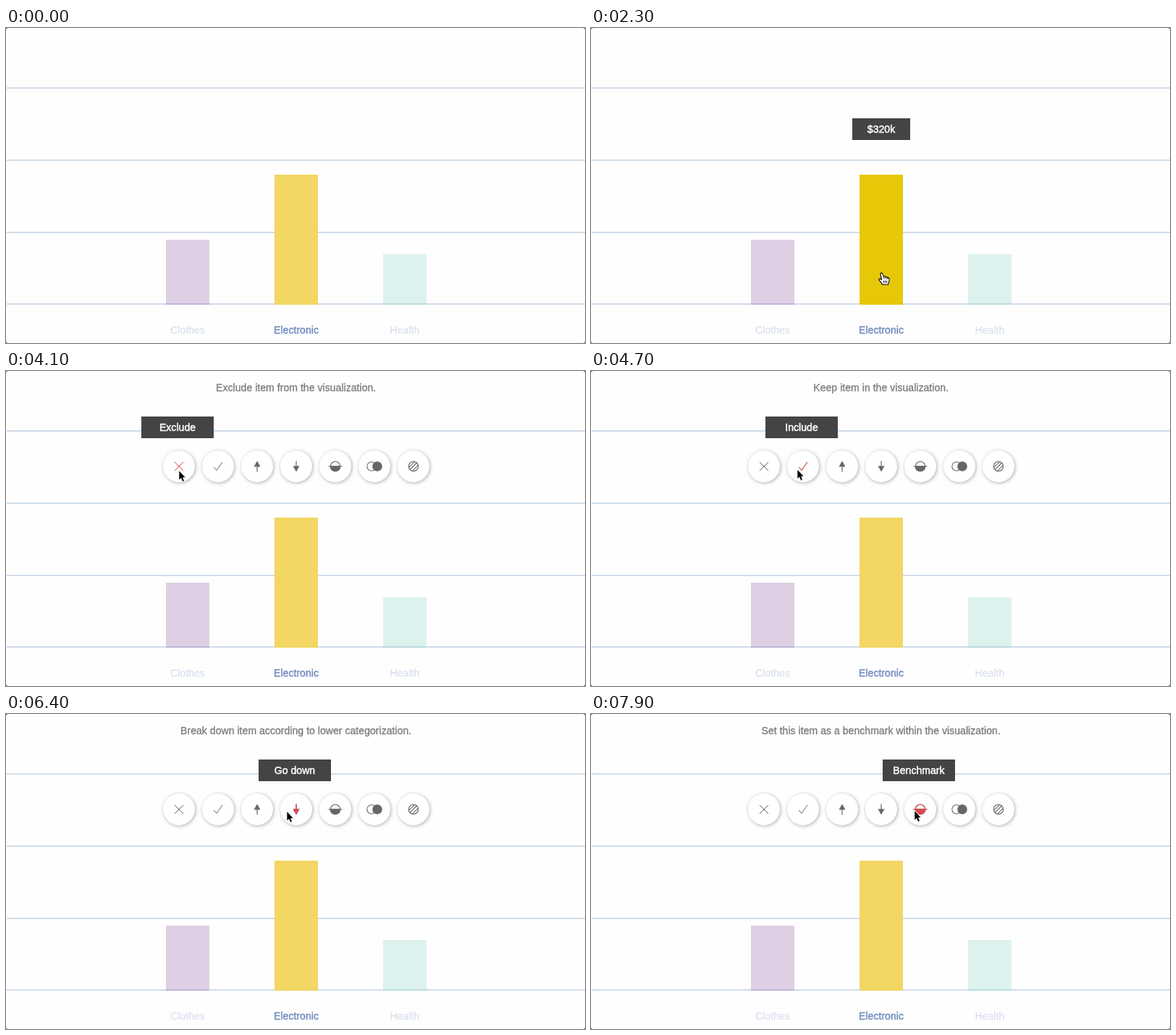
An HTML page that plays this animation: 800x436 px, repeating every 8000 ms.

```html
<!DOCTYPE html>
<html lang="en">
<head>
<meta charset="utf-8">
<title>Bar chart menu</title>
<style>
html, body { margin: 0; width: 100%; height: 100%; overflow: hidden; background: #777; }
svg { display: block; width: 800px; height: 436px; }
text { font: 14px "Liberation Sans", Arial, sans-serif; letter-spacing: .05px; text-anchor: middle; stroke-width: .35px; }
.grid { stroke: #d0dcea; stroke-width: 2; }
.dim { fill: #d6deec; stroke: #d6deec; stroke-width: .15px; }
.name { fill: #6b87bb; stroke: #6b87bb; }
.tip { fill: #fff; stroke: #fff; stroke-width: .5px; }
.note { fill: #7c7c7c; stroke: #7c7c7c; }
.box { fill: #444; }
.disc { fill: #fff; filter: drop-shadow(1px 1px 2.5px rgba(0, 0, 0, .32)); }
.icon { color: #666; }
.hot .icon { color: #dc4650; }

.bar, .menu, .cursor, .arrow, .hand, .hot, .value { animation: 8s linear infinite both; }
.bar { animation-name: shade; }
.menu { animation-name: menu; }
.cursor { animation-name: move; }
.arrow { animation-name: arrow; animation-timing-function: step-end; }
.hand { animation-name: hand; animation-timing-function: step-end; }
.value { animation-name: value; }
.exclude { animation-name: exclude; }
.include { animation-name: include; }
.up { animation-name: up; }
.down { animation-name: down; }
.bench { animation-name: bench; }

@keyframes shade {
  0%, 11.9% { fill: #f3d663; }
  13.6%, 43.7% { fill: #e7c809; }
  45.6%, 100% { fill: #f3d663; }
}
@keyframes menu { 0%, 31.2% { opacity: 0; } 33.6%, 100% { opacity: 1; } }
@keyframes arrow { 0% { opacity: 1; } 11.9% { opacity: 0; } 34.6% { opacity: 1; } }
@keyframes hand { 0% { opacity: 0; } 11.9% { opacity: 1; } 34.6% { opacity: 0; } }
@keyframes value { 0%, 12.2% { opacity: 0; } 13.8%, 30.6% { opacity: 1; } 31.8%, 100% { opacity: 0; } }
@keyframes exclude { 0%, 43.7% { opacity: 0; } 45%, 54.4% { opacity: 1; } 55.2%, 100% { opacity: 0; } }
@keyframes include { 0%, 55.3% { opacity: 0; } 56.2%, 66.3% { opacity: 1; } 67.1%, 100% { opacity: 0; } }
@keyframes up { 0%, 67.2% { opacity: 0; } 68.2%, 78.1% { opacity: 1; } 78.9%, 100% { opacity: 0; } }
@keyframes down { 0%, 79% { opacity: 0; } 79.8%, 88.2% { opacity: 1; } 89%, 100% { opacity: 0; } }
@keyframes bench { 0%, 89% { opacity: 0; } 89.9%, 100% { opacity: 1; } }

@keyframes move {
  0%, 7.4% { transform: translate(424px, 444px); }
  8.75% { transform: translate(421px, 428px); }
  11.25% { transform: translate(413px, 392px); }
  12.5% { transform: translate(409px, 376px); }
  15% { transform: translate(406px, 356px); }
  18.75% { transform: translate(404px, 342px); }
  21.25%, 31.25% { transform: translate(403px, 339px); }
  32.5% { transform: translate(396px, 325px); }
  35% { transform: translate(365px, 250px); }
  37.5% { transform: translate(340px, 198px); }
  40% { transform: translate(312px, 176px); }
  42.5% { transform: translate(272px, 154px); }
  45% { transform: translate(248px, 143px); }
  51.25%, 52.5% { transform: translate(239px, 138px); }
  55% { transform: translate(266px, 138px); }
  57.5% { transform: translate(283px, 137px); }
  60%, 64.4% { transform: translate(287px, 136px); }
  66.25% { transform: translate(312px, 136px); }
  67.5% { transform: translate(325px, 136px); }
  68.75% { transform: translate(328px, 136px); }
  74%, 76.9% { transform: translate(338px, 135px); }
  78.75% { transform: translate(372px, 135px); }
  80% { transform: translate(388px, 135px); }
  83.75% { transform: translate(396px, 135px); }
  86.25% { transform: translate(402px, 135px); }
  87.5% { transform: translate(412px, 135px); }
  88.75% { transform: translate(431px, 135px); }
  90.6% { transform: translate(442px, 134px); }
  96.25%, 100% { transform: translate(447px, 134px); }
}
</style>
</head>
<body>
<svg viewBox="0 0 800 436">
  <defs>
    <circle id="disc" r="22"/>
    <path id="i-cross" d="M-6-6 6 6M6-6-6 6" fill="none" stroke="currentColor"/>
    <path id="i-check" d="M-6 1-2 5.5 6-6" fill="none" stroke="currentColor"/>
    <path id="i-up" d="M0-7.5 4.5 .5H.6V7.5H-.6V.5H-4.5Z" fill="currentColor"/>
    <path id="i-down" d="M0 7.5 4.5-.5H.6V-7.5H-.6V-.5H-4.5Z" fill="currentColor"/>
    <g id="i-bench" stroke="currentColor" stroke-width="1.1">
      <circle r="6.7" fill="none"/>
      <path d="M-6.7 0A6.7 6.7 0 0 0 6.7 0Z" fill="currentColor"/>
      <path d="M-9.5 0H9.5"/>
    </g>
    <g id="i-merge" stroke="currentColor" stroke-width="1.1">
      <circle cx="-4" r="6.2" fill="none"/>
      <circle cx="4" r="6.2" fill="currentColor"/>
    </g>
    <g id="i-hatch" stroke="currentColor" stroke-width="1.1" fill="none">
      <circle r="6.7"/>
      <path d="M-6.4 1.4 1.4-6.4M-5 4.6 4.6-5M-1.6 6.4 6.4-1.6"/>
    </g>
  </defs>

  <rect width="800" height="436" rx="3.5" fill="#fefefe"/>
  <path class="grid" d="M1 83H800M1 183H800M1 283H800M1 382H800"/>

  <rect x="221" y="293" width="60" height="90" fill="#9160a8" fill-opacity=".3"/>
  <rect class="bar" x="371" y="203" width="60" height="180" fill="#f3d663"/>
  <rect x="521" y="313" width="60" height="70" fill="#8ed4c6" fill-opacity=".3"/>
  <text class="dim" x="251" y="423">Clothes</text>
  <text class="name" x="401" y="423">Electronic</text>
  <text class="dim" x="551" y="423">Health</text>

  <g class="value">
    <rect class="box" x="361" y="125" width="80" height="30"/>
    <text class="tip" x="401" y="145">$320k</text>
  </g>

  <g class="menu">
    <g class="disc">
      <use href="#disc" x="239" y="132"/>
      <use href="#disc" x="293" y="132"/>
      <use href="#disc" x="347" y="132"/>
      <use href="#disc" x="401" y="132"/>
      <use href="#disc" x="455" y="132"/>
      <use href="#disc" x="509" y="132"/>
      <use href="#disc" x="563" y="132"/>
    </g>
    <g class="icon">
      <use href="#i-cross" x="239" y="132"/>
      <use href="#i-check" x="293" y="132"/>
      <use href="#i-up" x="347" y="132"/>
      <use href="#i-down" x="401" y="132"/>
      <use href="#i-bench" x="455" y="132"/>
      <use href="#i-merge" x="509" y="132"/>
      <use href="#i-hatch" x="563" y="132"/>
    </g>
  </g>

  <g class="hot exclude">
    <use class="icon" href="#i-cross" x="239" y="132"/>
    <rect class="box" x="187" y="63" width="100" height="30"/>
    <text class="tip" x="237" y="83">Exclude</text>
    <text class="note" x="400.7" y="28">Exclude item from the visualization.</text>
  </g>
  <g class="hot include">
    <use class="icon" href="#i-check" x="293" y="132"/>
    <rect class="box" x="241" y="63" width="100" height="30"/>
    <text class="tip" x="291" y="83">Include</text>
    <text class="note" x="400.7" y="28">Keep item in the visualization.</text>
  </g>
  <g class="hot up">
    <use class="icon" href="#i-up" x="347" y="132"/>
    <rect class="box" x="295" y="63" width="100" height="30"/>
    <text class="tip" x="345" y="83">Go up</text>
    <text class="note" x="400.7" y="28">Aggregate items according to higher level categorization.</text>
  </g>
  <g class="hot down">
    <use class="icon" href="#i-down" x="401" y="132"/>
    <rect class="box" x="349" y="63" width="100" height="30"/>
    <text class="tip" x="399" y="83">Go down</text>
    <text class="note" x="400.7" y="28">Break down item according to lower categorization.</text>
  </g>
  <g class="hot bench">
    <use class="icon" href="#i-bench" x="455" y="132"/>
    <rect class="box" x="403" y="63" width="100" height="30"/>
    <text class="tip" x="453" y="83">Benchmark</text>
    <text class="note" x="400.7" y="28">Set this item as a benchmark within the visualization.</text>
  </g>

  <g class="cursor">
    <path class="arrow" d="M.3 .3V12.6L3 10 5 14.8 7 14 5 9.3H8.6Z" fill="#000" stroke="#fff" stroke-width="1.8" paint-order="stroke" stroke-linejoin="round"/>
    <g class="hand" stroke="#000" stroke-width="1.1" stroke-linejoin="round" stroke-linecap="round">
      <path d="M-3 2C-3.4-.2-.6-.6 0 1.4L1.5 5.6C2 4.2 4 4.5 4.3 6 5 5 6.7 5.3 6.9 6.7 8 6 9.2 6.7 9.2 8.2 9.4 11 8.4 12.5 7.8 16H-.6C-1.4 13.8-3.4 12-4.9 9.9-6 8.2-4 7.2-2.6 8.6L-1.4 9.7Z" fill="#fff"/>
      <path d="M1.5 5.6 2.2 8M4.3 6 4.8 8M6.9 6.7 7.2 8.5M1.6 11V13.5M3.7 11V13.5M5.8 11V13.5" fill="none" stroke-width=".9"/>
    </g>
  </g>
</svg>
</body>
</html>
```
